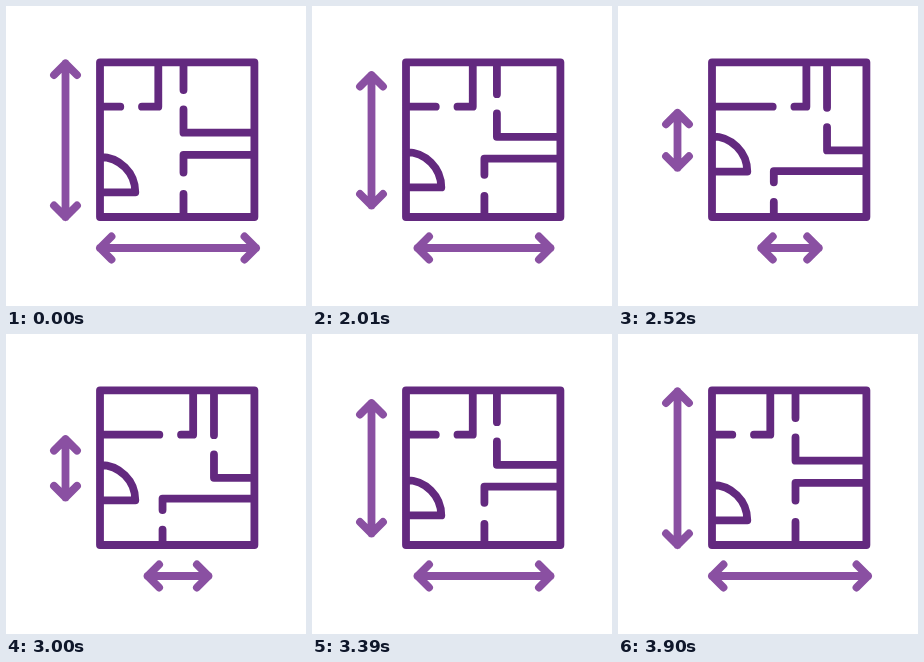
An HTML page for the animation above (3.93 s loop, 300 by 300 pixels).

```html
<!DOCTYPE html>
<html lang="en">
<head>
<meta charset="utf-8">
<title>Floor plan</title>
<style>
  html, body { margin: 0; width: 100%; height: 100%; overflow: hidden; background: #fff; }
  svg { display: block; width: 100vw; height: 100vh; }
  path { fill: none; stroke-width: 7.8; stroke-linecap: round; stroke-linejoin: round; }
</style>
</head>
<body>
<svg viewBox="0 0 300 300">
  <path id="plan" stroke="#63297f"/>
  <path id="arrows" stroke="#8a50a2"/>
</svg>
<script>
const LOOP = 3930, STEP = 30, START = 1500, HALF = 1200;
const plan = document.getElementById('plan');
const arrows = document.getElementById('arrows');

// cubic-bezier(.8, 0, .2, 1), solved by bisection
function ease(x) {
  let lo = 0, hi = 1, s;
  for (let i = 0; i < 30; i++) {
    s = (lo + hi) / 2;
    const bx = 2.4 * s * (1 - s) ** 2 + 0.6 * s * s * (1 - s) + s ** 3;
    if (bx < x) lo = s; else hi = s;
  }
  return s * s * (3 - 2 * s);
}

function planPath(p) {
  const at = (from, change) => from + change * p;
  const doorY = at(186.3, -21);
  const rightX = at(177.5, 32), rightY = at(126.7, 18);
  const lowX = at(177.5, -22), lowY = at(148.8, 16.6);
  return `M94 56.3H248.4V211H94Z
    M94 100.7H${at(114.3, 41)}
    M${at(136, 41)} 100.7H${at(152.3, 36.6)}V56.3
    M${rightX} 56.3V${at(84, 18)}
    M${rightX} ${at(103.3, 18)}V${rightY}H248.4
    M248.4 ${lowY}H${lowX}V${at(166.5, 10)}
    M${lowX} ${at(188, 8)}V211
    M94 ${doorY - 35.3}A35.3 35.3 0 0 1 129.3 ${doorY}H94`;
}

function arrowPath(p) {
  const head = 11.5, shrink = 50 * p;
  const top = 57.5 + shrink, bottom = 211 - shrink;
  const left = 94 + shrink, right = 250 - shrink;
  const vHead = (y, d) => `M${59.5 - head} ${y + d}L59.5 ${y}L${59.5 + head} ${y + d}`;
  const hHead = (x, d) => `M${x + d} ${242 - head}L${x} 242L${x + d} ${242 + head}`;
  return `M59.5 ${top}V${bottom}` + vHead(top, head) + vHead(bottom, -head) +
    `M${left} 242H${right}` + hHead(left, head) + hHead(right, -head);
}

function draw(now) {
  const t = Math.floor((now % LOOP) / STEP) * STEP;
  const u = Math.max(0, 1 - Math.abs(t - START - HALF) / HALF);
  const p = u ? ease(u) : 0;
  plan.setAttribute('d', planPath(p));
  arrows.setAttribute('d', arrowPath(p));
  requestAnimationFrame(draw);
}
draw(0);
</script>
</body>
</html>
```
